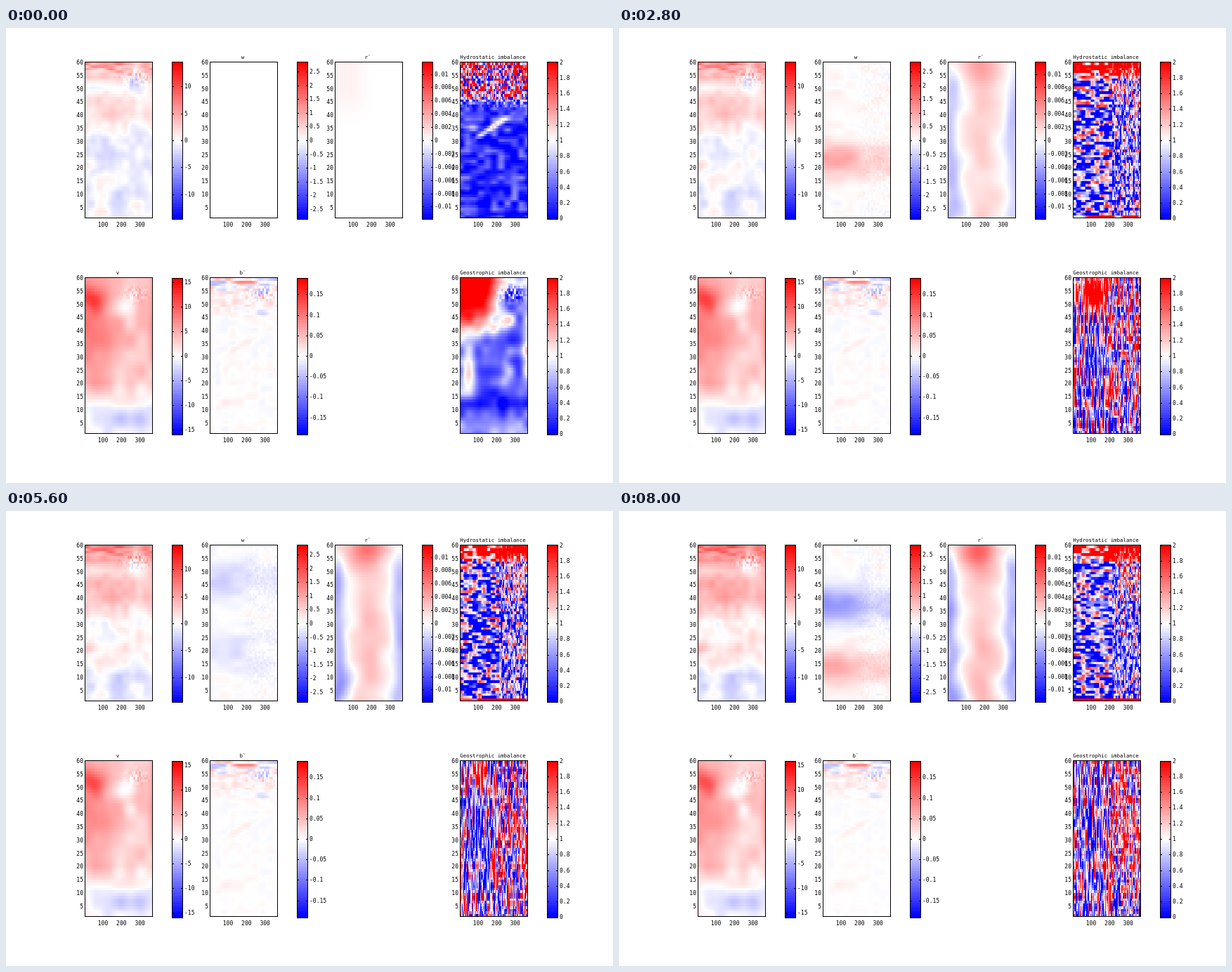
An HTML page with a canvas for the animation above (8400 ms loop, 864x648 px).

```html
<!DOCTYPE html>
<html lang="en">
<head>
<meta charset="utf-8">
<title>Field evolution</title>
<style>
html, body { margin: 0; width: 100%; height: 100%; overflow: hidden; background: #fff; }
canvas { display: block; }
</style>
</head>
<body>
<canvas id="stage" width="864" height="648"></canvas>
<script>
const ctx = document.getElementById('stage').getContext('2d');
const COLS = 73, ROWS = 59, FRAMES = 21, STEP = 400;
const WIDTH = 96, HEIGHT = 222;

const clamp = (v, lo, hi) => Math.min(hi, Math.max(lo, v));
const mix = (a, b, k) => a + (b - a) * k;
const smooth = (a, b, v) => { const k = clamp((v - a) / (b - a), 0, 1); return k * k * (3 - 2 * k); };
const bump = (v, mid, size) => Math.exp(-(((v - mid) / size) ** 2));
const spot = (x, y, cx, cy, sx, sy) => bump(x, cx, sx) * bump(y, cy, sy);

// Seeded random value in -1..1 for a lattice point
function rand(i, j, seed) {
  let h = Math.imul(i, 374761393) + Math.imul(j, 668265263) + Math.imul(seed + 7, 1274126177);
  h = Math.imul(h ^ (h >>> 13), 1274126177);
  h = Math.imul(h ^ (h >>> 15), 2246822519);
  return ((h ^ (h >>> 16)) >>> 0) / 2147483648 - 1;
}

function noise(x, y, seed) {
  const i = Math.floor(x), j = Math.floor(y);
  const u = smooth(0, 1, x - i), v = smooth(0, 1, y - j);
  return mix(mix(rand(i, j, seed), rand(i + 1, j, seed), u),
             mix(rand(i, j + 1, seed), rand(i + 1, j + 1, seed), u), v);
}

// Value at a row, from levels given at every tenth row
function profile(levels, row) {
  const i = Math.min(Math.floor(row / 10), levels.length - 2);
  return mix(levels[i], levels[i + 1], row / 10 - i);
}

const speckle = (x, y, c) => rand(c >> 1, y, 3) * spot(x, y, .75, 53.5, .17, 2.6);

function fieldU(x, y, c, t) {
  const first = profile([0, -.06, -.05, -.05, .1, .06, .36], y);
  const last = profile([-.06, -.11, .14, .06, .28, .28, .56], y);
  return mix(first, last, t) + .1 * noise(x * 4, y / 5, 1) + .06 * noise(x * 10, y / 3, 4)
    + .15 * noise(x * 8, y, 2) * smooth(52, 57, y) + .3 * speckle(x, y, c)
    - mix(.15, .2, t) * spot(x, y, .75, 52, .2, 4);
}

function fieldV(x, y, c, t) {
  const flow = profile([-.04, -.07, .28, .33, .38, .36, .3], y);
  const tilt = flow > 0 ? 1.3 - .65 * smooth(.1, .6, x) : 1;
  return flow * tilt * mix(1.05, .85, t) + .09 * noise(x * 6, y / 6, 11) + .18 * speckle(x, y, c)
    + .32 * spot(x, y, .12, 52, .18, 4) - .17 * spot(x, y, .6, 49, .15, 4)
    + .15 * t * spot(x, y, .7, 45, .1, 2.5) - .15 * t * spot(x, y, .68, 38, .1, 6)
    + .12 * bump(x, 1, .05) * smooth(15, 30, y) - .17 * spot(x, y, .65, 6, .25, 4);
}

// Key points of the two bands of w: frame, centre row, strength
const UPPER = [[0, 44, 0], [5, 44, .5], [9, 47, -.42], [12, 55, .33], [15, 43, -.42], [17, 48, -.48], [20, 37, -.4]];
const LOWER = [[0, 17, 0], [5, 17, .32], [9, 28, .35], [12, 16, .42], [15, 22, -.38], [17, 25, -.15], [20, 13, .33]];

function band(keys, y, n) {
  const next = Math.max(1, keys.findIndex(key => key[0] >= n));
  const [from, row, level] = keys[next - 1], [to, nextRow, nextLevel] = keys[next];
  const k = (n - from) / (to - from);
  return mix(level, nextLevel, k) * bump(y, mix(row, nextRow, k), 7);
}

function fieldW(x, y, c, t, n) {
  if (!n) return 0;
  const side = 1 - .5 * smooth(.3, .75, x);
  return (band(UPPER, y, n) + band(LOWER, y, n)) * side + .05 * noise(x * 5, y / 3, 22 + n)
    + .04 * rand(c >> 1, y, n) * smooth(.4, .7, x);
}

function fieldR(x, y, c, t, n) {
  const grown = 1 - Math.exp(-n / 6);
  const sway = .05 * noise(y / 9, n / 5, 32);
  const edges = bump(x, .03 + sway, .12) + .8 * bump(x, .97 + sway, .12);
  const core = .24 * bump(x, .5 + sway, .25) + .38 * spot(x, y, .42, 58, .32, 7);
  return grown * (core - .36 * edges * smooth(60, 50, y) - .22 * spot(x, y, .17, 5, .12, 6)
    + .1 * noise(x * 4, y / 7 + n / 4, 31)) + .05 * (1 - grown) * smooth(.6, .2, x) * smooth(34, 50, y);
}

function fieldB(x, y, c, t) {
  const fade = mix(1, .6, t);
  return (.4 * noise(x * 5, y, 41) + .08) * smooth(50, 59, y)
    + .12 * fade * noise(x * 11, y / 1.4, 42) * smooth(41, 50, y)
    + .045 * fade * noise(x * 9, y / 2.5, 43)
    + .06 * bump(y, 27 + 15 * x, 1.5) * bump(x, .45, .3) + .05 * spot(x, y, .3, 13, .2, 4)
    + .06 * spot(x, y, .5, 51, .4, 4) - .12 * spot(x, y, .75, 46.5, .16, 1)
    + .35 * fade * speckle(x, y, c);
}

function hydrostatic(x, y, c, t, n) {
  if (!n) {
    const calm = -.8 + .35 * noise(x * 10, y / 2, 51)
      + .8 * bump(y, 27 + 17 * x, 1.3) * bump(x, .47, .27) + .7 * spot(x, y, .15, 35, .15, 1.5);
    const wild = 1.9 * noise(c / 1.8, y, 52) + .1 + .6 * smooth(54, 60, y);
    return mix(calm, wild, smooth(41, 49, y));
  }
  if (y === 1) return 1.2 + 1.3 * noise(c / 8, 0, n);
  const grain = x < .58 ? noise(c / 5, y, 60 + n) : noise(c / 1.25, y / 1.3, 90 + n);
  return -.55 + .2 * smooth(.5, .7, x) + 1.45 * grain + 1.8 * smooth(52, 57, y)
    + .45 * spot(x, y, .75, 48, .3, 7);
}

function geostrophic(x, y, c, t, n) {
  if (!n) {
    return -.7 + 2.1 * smooth(.7, .22, x + .06 * noise(y / 5, 0, 72)) * smooth(28, 54, y)
      + .9 * spot(x, y, .12, 22, .13, 9) + .8 * spot(x, y, 1, 32, .09, 18)
      + .85 * spot(x, y, .68, 43, .14, 4) + .5 * spot(x, y, .67, 25, .1, 6)
      + .65 * spot(x, y, .8, 58, .3, 3) + .3 * smooth(9, 2, y) - .25 * bump(y, 12, 2.5)
      + .25 * noise(x * 8, y / 4, 71) + .8 * speckle(x, y, c);
  }
  const grain = noise(c, y / (x < .56 ? 4 : 2.8), 120 + n);
  const block = 2.6 * (1 - t * t) * spot(x, y, .31, 54, mix(.3, .07, t), 6.5);
  return -.2 + 1.55 * grain + block - .5 * spot(x, y, .32, 26, .18, 14)
    + mix(.15, .75, t) * spot(x, y, .82, 40, .2, 22)
    + .7 * bump(y, 21, 12) * (bump(x, .02, .05) + bump(x, .53, .06) + bump(x, .98, .06));
}

const BARS = {
  u: { mid: 0, limit: 14.5, step: 5 },
  w: { mid: 0, limit: 2.85, step: .5 },
  r: { mid: 0, limit: .0118, step: .002 },
  v: { mid: 0, limit: 15.95, step: 5 },
  b: { mid: 0, limit: .191, step: .05 },
  ratio: { mid: 1, limit: 1.0001, step: .2 }
};
const UPPER_ROW = { y: 49, barTop: 48, barBottom: 272 };
const LOWER_ROW = { y: 356, barTop: 356, barBottom: 579 };
const panel = (row, col, title, field, bar) => ({ ...row, x: 113 + 178 * col, title, field, bar });
const panels = [
  panel(UPPER_ROW, 0, '', fieldU, BARS.u),
  panel(UPPER_ROW, 1, 'w', fieldW, BARS.w),
  panel(UPPER_ROW, 2, 'r`', fieldR, BARS.r),
  panel(UPPER_ROW, 3, 'Hydrostatic imbalance', hydrostatic, BARS.ratio),
  panel(LOWER_ROW, 0, 'v', fieldV, BARS.v),
  panel(LOWER_ROW, 1, 'b`', fieldB, BARS.b),
  panel(LOWER_ROW, 3, 'Geostrophic imbalance', geostrophic, BARS.ratio)
];

function colour(v) {
  const pale = Math.round(255 * (1 - Math.min(1, Math.abs(v))));
  return v > 0 ? [255, pale, pale] : [pale, pale, 255];
}

function text(label, x, y, align, size = 8) {
  ctx.font = `${size}px "DejaVu Sans Mono", monospace`;
  ctx.textAlign = align;
  ctx.fillText(label, x, y);
}

function drawBar({ x, y, barTop, barBottom, bar }) {
  const left = x + 123, height = barBottom - barTop;
  for (let i = 0; i < 64; i++) {
    ctx.fillStyle = `rgb(${colour(1 - i / 31.5)})`;
    const start = Math.round(i * height / 64);
    ctx.fillRect(left, barTop + start, 15, Math.round((i + 1) * height / 64) - start);
  }
  ctx.strokeRect(left + .5, barTop + .5, 15, height);
  ctx.fillStyle = '#000';
  const count = Math.floor(bar.limit / bar.step);
  for (let i = -count; i <= count; i++) {
    const tickY = Math.round(y + 112 - i * bar.step / bar.limit * 111.5);
    ctx.fillRect(left, tickY - 1, 3, 1);
    ctx.fillRect(left + 13, tickY - 1, 3, 1);
    const value = Number((bar.mid + i * bar.step).toFixed(3));
    text(String(value), left + 18, tickY, 'left');
  }
}

function drawAxes(p) {
  const { x, y, title } = p;
  ctx.fillStyle = '#000';
  for (let i = 1; i <= 12; i++) text(String(i * 5), x - 3, y + 1 + (12 - i) * 18.8, 'right');
  for (let i = 0; i < 3; i++) text(String((i + 1) * 100), x + 25 + i * 26.3, y + 232, 'center');
  text(title, x + 46, y - 6.5, 'center', 7.4);
  drawBar(p);
}

const tile = document.createElement('canvas');
tile.width = COLS;
tile.height = ROWS;
const tileCtx = tile.getContext('2d');
const image = tileCtx.createImageData(COLS, ROWS);

function drawField({ x, y, field }, n) {
  const t = n / (FRAMES - 1);
  for (let r = 0, p = 0; r < ROWS; r++) {
    for (let c = 0; c < COLS; c++, p += 4) {
      image.data.set(colour(field((c + .5) / COLS, ROWS - r, c, t, n)), p);
      image.data[p + 3] = 255;
    }
  }
  tileCtx.putImageData(image, 0, 0);
  ctx.drawImage(tile, x, y, WIDTH, HEIGHT);
  ctx.strokeRect(x - .5, y - .5, WIDTH, HEIGHT);
}

ctx.fillStyle = '#fff';
ctx.fillRect(0, 0, 864, 648);
ctx.textBaseline = 'middle';
ctx.imageSmoothingEnabled = false;
ctx.lineWidth = 1;
ctx.strokeStyle = '#000';
panels.forEach(drawAxes);

let shown = -1;
function play() {
  const n = Math.floor(performance.now() / STEP) % FRAMES;
  if (n !== shown) {
    panels.forEach(p => drawField(p, n));
    shown = n;
  }
  requestAnimationFrame(play);
}
play();
</script>
</body>
</html>
```
